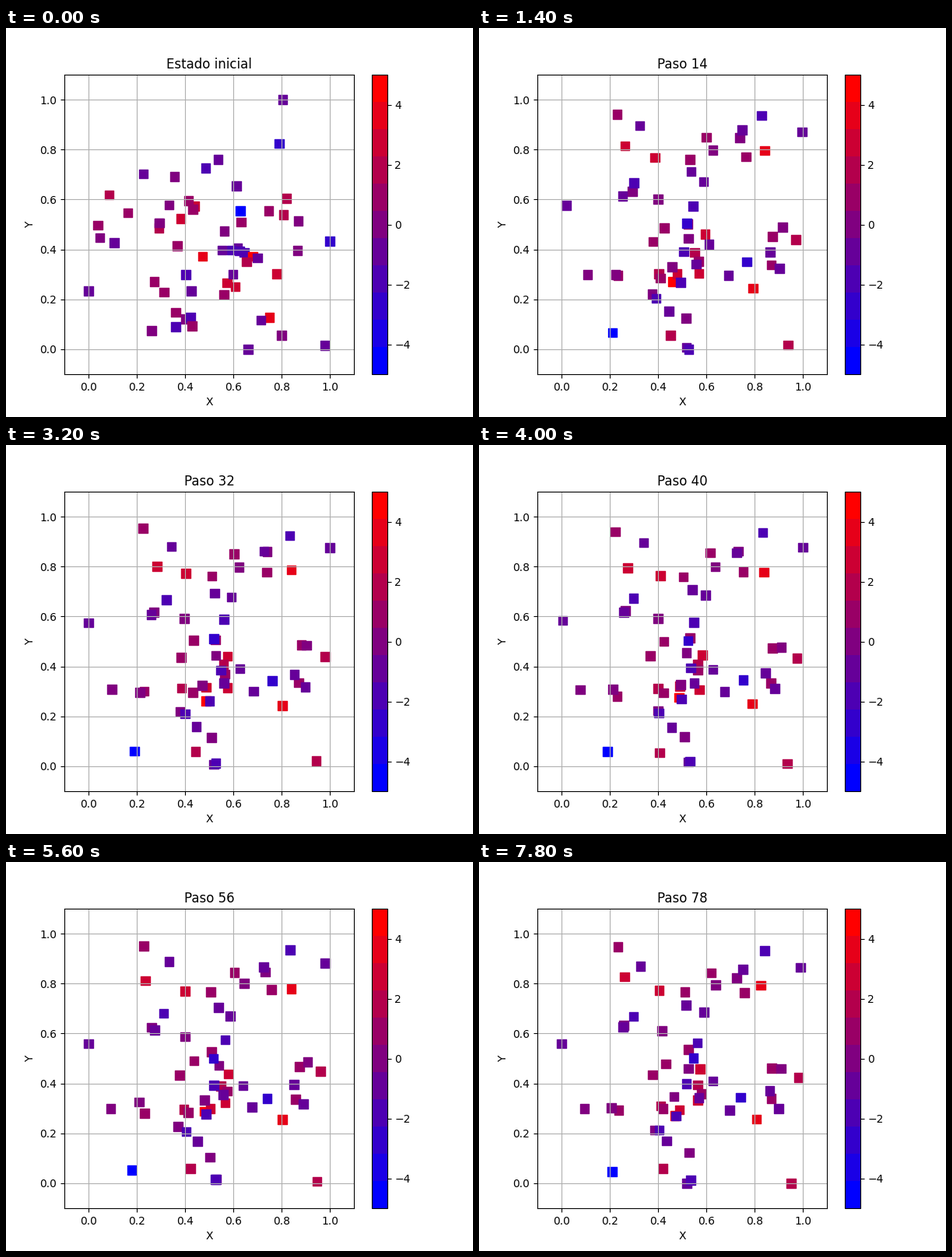
Write a matplotlib script that moves like this. It is 600 px wide and 500 px high and loops after 8000 ms.

```python
import numpy as np
import matplotlib.pyplot as plt
from matplotlib.animation import FuncAnimation
from matplotlib.colors import LinearSegmentedColormap

FRAMES, INTERVAL = 40, 200
SPREAD, MEMORY = 0.01, 0.85   # size and persistence of the wandering

# Resting places of each charge, as x, y in hundredths of the unit square.
HOMES = {
    5: [47, 27],
    4: [84, 78, 80, 26],
    3: [26, 81, 41, 78, 58, 45, 57, 31, 49, 30],
    2: [57, 40, 96, 44, 40, 31, 43, 6, 95, 2],
    1: [23, 94, 52, 77, 61, 85, 74, 77, 53, 52, 43, 49,
        38, 44, 57, 36, 87, 33, 87, 47, 24, 30, 42, 30],
    0: [28, 62, 74, 84, 63, 79, 40, 59, 53, 45, 91, 48,
        9, 31, 22, 31, 38, 22, 46, 33, 51, 11],
    -1: [33, 88, 25, 62, 0, 56, 74, 87, 99, 87, 53, 70, 59, 67,
         55, 34, 63, 40, 69, 30, 86, 38, 89, 32, 45, 16, 52, 0],
    -2: [31, 67, 83, 94, 55, 57, 52, 40, 40, 21, 49, 27, 53, 1],
    -3: [52, 50, 76, 35],
    -5: [20, 6],
}

home = np.concatenate([np.reshape(p, (-1, 2)) for p in HOMES.values()]) / 100
charge = np.repeat(list(HOMES), [len(p) // 2 for p in HOMES.values()])


def initial_state(rng):
    """A normal cloud scaled to fill the unit square, with mixed charges."""
    cloud = rng.normal(size=home.shape)
    cloud -= cloud.min(axis=0)
    return cloud / cloud.max(axis=0), rng.permutation(charge)


def wander(rng):
    """Random walk pulled back to the resting places, inside the square."""
    kicks = rng.normal(0, SPREAD, (FRAMES,) + home.shape)
    shift = [kicks[0]]
    for kick in kicks[1:]:
        shift.append(MEMORY * shift[-1] + np.sqrt(1 - MEMORY**2) * kick)
    return np.clip(home + shift, 0, 1)


rng = np.random.default_rng(11)
start, start_charge = initial_state(rng)
paths = wander(rng)

cmap = LinearSegmentedColormap.from_list("charge", ["blue", "red"], N=11)
fig, ax = plt.subplots(figsize=(6, 5), dpi=100)
dots = ax.scatter(*start.T, c=start_charge, cmap=cmap,
                  vmin=-5, vmax=5, s=70, marker="s")
fig.colorbar(dots)
ax.set(xlim=(-0.1, 1.1), ylim=(-0.1, 1.1), xlabel="X", ylabel="Y")
ax.grid(True)
title = ax.set_title("Estado inicial")


def update(k):
    if k == 0:
        places, values, text = start, start_charge, "Estado inicial"
    else:
        places, values, text = paths[k], charge, f"Paso {2 * k}"
    dots.set_offsets(places)
    dots.set_array(values)
    title.set_text(text)
    return dots, title


anim = FuncAnimation(fig, update, frames=FRAMES, interval=INTERVAL,
                     repeat=True, repeat_delay=0)
plt.show()
```
